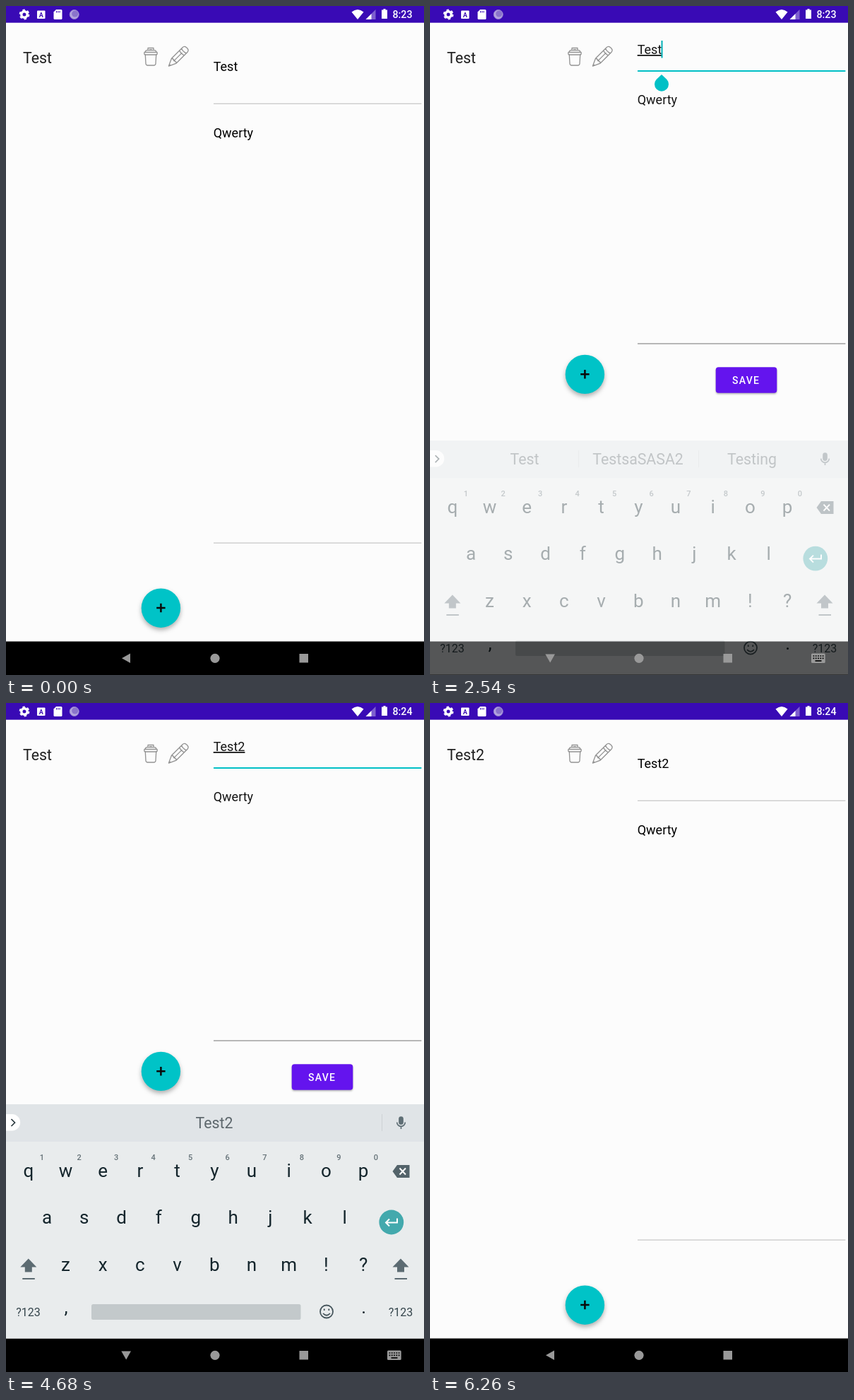
An HTML page for the animation above (8 s loop, 592x947 px).

```html
<!DOCTYPE html>
<html lang="en">
<head>
<meta charset="utf-8">
<title>Notes</title>
<style>
  html, body { margin: 0; width: 100%; height: 100%; overflow: hidden; background: #fcfcfc; }
  svg { display: block; width: 592px; height: 947px; font-family: Roboto, sans-serif; }
  text { white-space: pre; }
  filter { color-interpolation-filters: sRGB; }
  .mid { text-anchor: middle; }
  .note { font-size: 18px; }
  .list { font-size: 21.3px; fill: #212121; }
  .key { font-size: 26px; fill: #14252c; }
  .hint { font-size: 11px; font-weight: 500; fill: #647177; }
  .mode { font-size: 16px; fill: #35454c; }
  .word { font-size: 21.3px; fill: #5d676c; }
  .outline { fill: none; stroke: #929292; stroke-width: 1.3; stroke-linejoin: round; stroke-linecap: round; }
</style>
</head>
<body>
<svg viewBox="0 0 592 947">
  <defs>
    <filter id="shadow" x="-30%" y="-30%" width="160%" height="180%">
      <feDropShadow dx="0" dy="3.5" stdDeviation="3" flood-opacity=".3"/>
    </filter>
    <filter id="lowShadow" x="-10%" y="-20%" width="120%" height="160%">
      <feDropShadow dx="0" dy="1.5" stdDeviation="1.2" flood-opacity=".3"/>
    </filter>
  </defs>
  <rect width="592" height="947" fill="#fcfcfc"/>

  <!-- status bar -->
  <rect width="592" height="23.7" fill="#390ab5"/>
  <g fill="#fff">
    <circle cx="26" cy="12" r="4.2" fill="none" stroke="#fff" stroke-width="3.4"/>
    <circle cx="26" cy="12" r="6.4" fill="none" stroke="#fff" stroke-width="2" stroke-dasharray="3.4 3.3"/>
    <rect x="44" y="6.5" width="11.5" height="11.5" rx="1"/>
    <text class="mid" x="49.8" y="15.6" font-size="9" font-weight="700" fill="#390ab5">A</text>
    <path d="M71 5h7q1.5 0 1.5 1.5v11q0 1.5-1.5 1.5h-9q-1.5 0-1.5-1.5v-9z"/>
    <path d="M71.5 7v2.5m2.300-2.500v2.500m2.300-2.500v2.500" stroke="#390ab5"/>
    <circle cx="96.700" cy="12" r="6.500" fill="#b3a4de" stroke="#9683d1"/>
    <circle cx="97.700" cy="11" r="4.500" fill="#8a74cb"/>
    <path d="M489.500 8.500Q498 1.500 506.500 8.500L498 19z"/>
    <path d="M523.500 5v14h-14z" opacity=".35"/>
    <path d="M517.500 11v8h-8z"/>
    <path d="M534.500 4h3v1.500h2.500v12.500h-8v-12.500h2.500z"/>
    <text id="clock" x="547.500" y="17" font-size="14.200" font-weight="500">8:23</text>
  </g>

  <!-- list row -->
  <text class="list" id="rowTitle" x="24" y="81">Test</text>
  <text class="list" id="rowNext" x="24" y="81">Test2</text>
  <g class="outline">
    <path d="M197.300 69l.7 12.500q.2 2.500 2.700 2.500h8.600q2.500 0 2.700-2.500l.7-12.500"/>
    <path d="M196 65.500h18q.8 3.500-1.500 3.500h-15q-2.300 0-1.500-3.500zM197 65.500q.5-2.800 3-2.800h10q2.500 0 3 2.800M201 62.500v-3h8v3M203.500 62h3"/>
    <path transform="translate(243.500 72) rotate(45)" d="M0 18.500L-4.800 8V-14q0-4 4.800-4t4.800 4V8zM-4.800 8q2.400-2 4.800 0q2.400-2 4.800 0M0 8V-8M-4.800-8q4.800 2 9.600 0M-4.800-12q4.800 2 9.600 0M-1.200 16h2.400"/>
  </g>

  <!-- note -->
  <text class="note" id="title" x="293.700"></text>
  <rect id="titleLine" x="294" width="294.400"/>
  <text class="note" id="content" x="293.700">Qwerty</text>
  <rect id="contentLine" x="294" width="294.400"/>
  <rect id="caret" width="2" height="24.500" fill="#00afb5"/>
  <path id="handle" d="M328 97l7.200 6.800a10 10 0 1 1-14.400 0z" fill="#00c0c6"/>
  <g id="save">
    <rect x="404.700" y="834" width="86.600" height="36.500" rx="4" fill="#6414ee" filter="url(#lowShadow)"/>
    <text x="428" y="857.500" font-size="14" font-weight="500" letter-spacing="1.250" fill="#fff">SAVE</text>
  </g>
  <g id="fab">
    <circle cx="219.400" cy="852.200" r="27.700" fill="#00c3c7" filter="url(#shadow)"/>
    <path d="M213.200 852h12.400M219.400 845.800v12.400" stroke="#0a0a0a" stroke-width="2.500"/>
  </g>

  <rect y="899.500" width="592" height="48" fill="#000"/>
  <g id="keyboard">
    <rect y="568" width="592" height="331.500" fill="#e9eced"/>
    <rect y="568" width="592" height="53" fill="#e0e4e7"/>
    <path d="M0 582h8.500a11.700 11.700 0 0 1 0 23.400H0z" fill="#fff"/>
    <path d="M7.500 589l5 5-5 5" fill="none" stroke="#2c3a40" stroke-width="1.700"/>
    <g id="words">
      <path d="M210.500 582v24M380.500 582v24" stroke="#cdd2d5"/>
      <text class="word mid" x="134" y="602">Test</text>
      <text class="word mid" x="294.500" y="602">TestsaSASA2</text>
      <text class="word mid" x="456" y="602">Testing</text>
    </g>
    <g id="typedWord">
      <path d="M532.500 582v24" stroke="#cdd2d5"/>
      <text class="word mid" x="295" y="602">Test2</text>
    </g>
    <g fill="none" stroke="#5f6e75" stroke-width="1.700">
      <rect x="557" y="586" width="5" height="10" rx="2.500" fill="#5f6e75"/>
      <path d="M553.700 593.500a5.800 5.800 0 0 0 11.600 0M559.500 599.500v3.500"/>
    </g>
    <path d="M547.500 663l6.500-9h17.500v18h-17.500z" fill="#53636a"/>
    <path d="M557.500 658.500l8.500 9m0-9l-8.500 9" stroke="#fff" stroke-width="2"/>
    <circle cx="545.800" cy="735" r="17.400" fill="#43a9ad"/>
    <path d="M554 729.500v6h-16m5-5l-5 5 5 5" fill="none" stroke="#fff" stroke-width="2"/>
    <g fill="#5c6b72">
      <path d="M31.800 786.500l11.500 12h-6.500v7h-10v-7h-6.500zM23.300 814h17.500v2h-17.500z"/>
      <path d="M559 786.500l11.500 12h-6.500v7h-10v-7h-6.500zM550.500 814h17.500v2h-17.500z"/>
    </g>
    <rect x="121" y="851" width="296.500" height="22" rx="2.500" fill="#c3c9cb"/>
    <g fill="none" stroke="#45545b" stroke-width="1.800">
      <circle cx="454" cy="861.500" r="9"/>
      <path d="M449 864q5 5.500 10 0"/>
      <path d="M450.700 857.500v2.500M457.300 857.500v2.500"/>
    </g>
  </g>

  <g fill="#999">
    <path id="back" d="M176 916.500v13.500l-12-6.700z"/>
    <path id="down" d="M163.300 917.500h13.700l-6.800 12z"/>
    <circle cx="296" cy="923.300" r="6.600"/>
    <rect x="415.500" y="917" width="12.500" height="12.500"/>
    <g id="switcher">
      <rect x="540" y="916.500" width="19.700" height="13.500" rx="1.500"/>
      <path d="M542.500 920h15M542.500 923.300h15" stroke="#000" stroke-width="1.700" stroke-dasharray="1.800 1.500"/>
      <path d="M545.500 927h9" stroke="#000" stroke-width="1.700"/>
    </g>
  </g>
  <circle id="touch" r="10.500" fill="#dcd8e2" fill-opacity=".62" stroke="#a9a5b0" stroke-opacity=".35"/>
</svg>
<script>
const LOOP = 8000, STEP = 112.94, PHASE = 500;
const TEAL = '#00c0c6';
const KEY_PITCH = 52.7;
const $ = id => document.getElementById(id);
const set = (id, attrs) => { for (const k in attrs) $(id).setAttribute(k, attrs[k]); };
const show = (id, on) => { $(id).style.display = on ? '' : 'none'; };
const clamp = v => Math.max(0, Math.min(1, v));
const within = (t, spans) => spans.some(([a, b]) => t >= a && t < b);

function addKeys(chars, x, y, cls = 'key', pitch = KEY_PITCH) {
  [...chars].forEach((char, i) => addLabel(char, x + i * pitch, y, cls));
}
function addLabel(label, x, y, cls) {
  const el = document.createElementNS('http://www.w3.org/2000/svg', 'text');
  el.textContent = label;
  el.setAttribute('class', cls + ' mid');
  el.setAttribute('x', x);
  el.setAttribute('y', y);
  $('keyboard').append(el);
}
addKeys('qwertyuiop', 31.8, 671);
addKeys('1234567890', 51, 647, 'hint', 52.55);
addKeys('asdfghjkl', 58.1, 737);
addKeys('zxcvbnm!?', 84.5, 804);
addKeys(',.', 85, 864, 'key', 8 * KEY_PITCH);
addLabel('?123', 31.5, 868, 'mode');
addLabel('?123', 559, 868, 'mode');

const TITLE_BLINK = [[2300, 2800], [3320, 3880], [4110, 4670], [5120, 5580]];
const TOUCHES = [
  { from: 1400, to: 1740, x: 242, y: 70 },
  { from: 2080, to: 2300, x: 360, y: 88 },
  { from: 5690, to: 5910, x: 439, y: 522 },
];

function line(id, y, focused, editing) {
  set(id, {
    y: focused ? y - 1 : y - .3,
    height: focused ? 2 : 1.2,
    fill: focused ? TEAL : editing ? '#8c8c8c' : '#c6c6c6',
  });
}

function drawNote(t) {
  const editing = within(t, [[1850, 5910]]);
  const titleFocus = within(t, [[2300, 5910]]);
  const compact = within(t, [[2530, 5910]]);
  const typed = t >= 3660;
  const ink = editing ? '#151515' : '#000';

  $('title').textContent = typed ? 'Test2' : 'Test';
  set('title', { y: compact ? 68 : 92, fill: ink, 'text-decoration': titleFocus ? 'underline' : 'none' });
  set('content', { y: compact ? 139 : 186, fill: ink });
  line('titleLine', compact ? 92 : 138, titleFocus, editing);
  line('contentLine', compact ? 477.7 : 759.8, editing && !titleFocus, editing);

  show('caret', titleFocus ? within(t, TITLE_BLINK) : editing);
  set('caret', {
    x: !titleFocus ? 293.7 : typed ? 337 : 327.5,
    y: !titleFocus ? 166.5 : compact ? 49 : 73,
  });
  show('handle', within(t, [[2530, 3880]]));
  show('save', editing);
  set('save', { transform: `translate(0 ${compact ? -322.7 : 0})` });
  set('fab', { transform: `translate(0 ${compact ? -330.8 : 0})` });

  show('back', !compact);
  show('down', compact);
  show('switcher', compact);
}

function drawKeyboard(t) {
  const enter = clamp((t - 2450) / 300), leave = clamp((t - 5860) / 300);
  const offset = 90 * (1 - enter) ** 2 + 125 * leave ** 2;
  set('keyboard', {
    opacity: clamp(enter * 1.32) * (1 - leave),
    transform: `translate(0 ${offset})`,
  });
  show('words', t < 3660);
  show('typedWord', t >= 3660);
}

function draw(time) {
  const t = PHASE + Math.floor((time - PHASE) / STEP + .02) * STEP;
  drawNote(t);
  drawKeyboard(t);

  const rowFade = clamp((t - 5950) / 250);
  set('rowTitle', { opacity: 1 - rowFade });
  set('rowNext', { opacity: rowFade });
  $('clock').textContent = t < 3090 ? '8:23' : '8:24';

  const touch = TOUCHES.find(({ from, to }) => t >= from && t < to);
  show('touch', touch);
  if (touch) set('touch', { cx: touch.x, cy: touch.y });
}

const start = performance.now();
function frame() {
  draw((performance.now() - start) % LOOP);
  requestAnimationFrame(frame);
}
frame();
</script>
</body>
</html>
```
